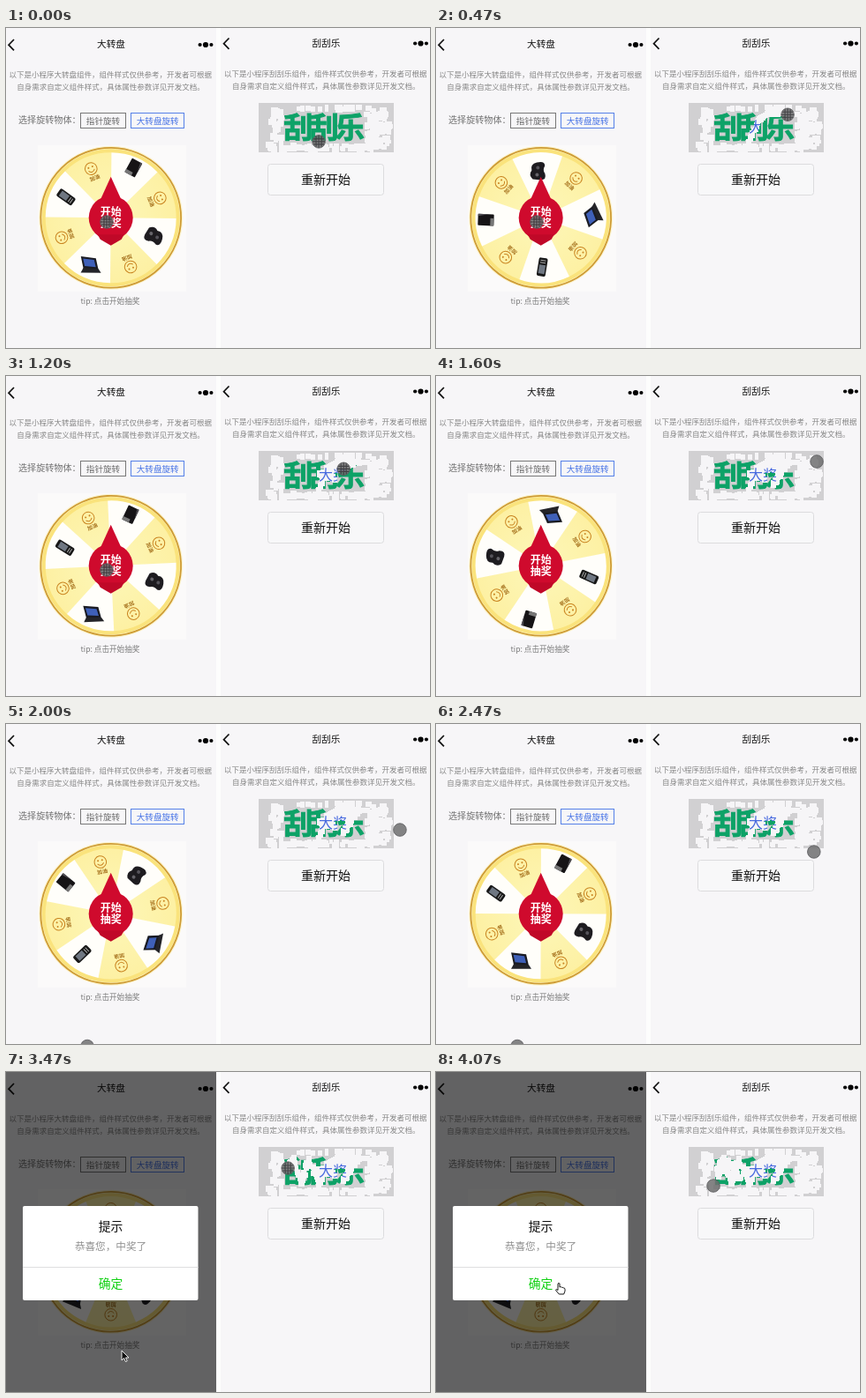
An HTML page with a canvas for the animation above (4.14 s loop, 480x363 px).

```html
<!DOCTYPE html>
<html lang="zh">
<head>
<meta charset="utf-8">
<title>大转盘与刮刮乐</title>
<style>
html, body { margin: 0; width: 100%; height: 100%; overflow: hidden; background: #fdfdfd; }
#stage { position: absolute; left: 0; top: 0; width: 480px; height: 363px; }
svg, canvas { position: absolute; left: 0; top: 0; }
#cover { left: 286px; top: 85px; }
text { font-family: "Noto Sans CJK SC", "Noto Sans CJK", "Noto Sans CJK JP", sans-serif; text-anchor: middle; }
.title { font-size: 10.6px; font-weight: 500; fill: #111; }
.note { font-size: 8.5px; font-weight: 500; fill: #868686; }
.left { text-anchor: start; }
.line { fill: none; stroke-width: 1; }
</style>
</head>
<body>
<div id="stage">
<svg width="480" height="363">
  <defs>
    <g id="nav">
      <path d="M9 13L3 19.2L9 25.4" fill="none" stroke="#111" stroke-width="1.7"/>
      <circle cx="219.6" cy="19" r="2.1"/><circle cx="226" cy="19" r="3.1"/><circle cx="232.4" cy="19" r="2.1"/>
    </g>
    <path id="slice" d="M0 0V-75A75 75 0 0 1 53.03 -53.03Z" fill="#fffefa"/>
    <g id="smile" transform="translate(0 -60)">
      <circle r="6.8" class="line" stroke="#c98420"/>
      <path d="M-3.6 1.6Q0 6 3.6 1.6" class="line" stroke="#c98420"/>
      <circle cx="-2.4" cy="-1.8" r="1" fill="#c98420"/><circle cx="2.4" cy="-1.8" r="1" fill="#c98420"/>
      <text y="13.3" font-size="6" font-weight="700" fill="#a5701c">加油</text>
    </g>
    <radialGradient id="gold">
      <stop offset=".3" stop-color="#fdf5b2"/><stop offset="1" stop-color="#fdf0a2"/>
    </radialGradient>
  </defs>

  <rect width="238" height="363" fill="#f7f6f8"/>
  <rect x="243" width="237" height="363" fill="#f7f6f8"/>

  <use href="#nav"/>
  <text class="title" x="119" y="22">大转盘</text>
  <text class="note" x="118.3" y="55.6">以下是小程序大转盘组件，组件样式仅供参考，开发者可根据</text>
  <text class="note" x="118.5" y="69.6">自身需求自定义组件样式，具体属性参数详见开发文档。</text>
  <text class="left" x="14" y="108" font-size="10.1" font-weight="500" fill="#707070">选择旋转物体：</text>
  <rect class="line" x="84.5" y="96.5" width="51" height="17" stroke="#777"/>
  <text x="110" y="108.6" font-size="9.6" font-weight="500" fill="#6a6a6a">指针旋转</text>
  <rect class="line" x="141.5" y="96.5" width="60" height="17" stroke="#5580e8"/>
  <text x="171.7" y="108.6" font-size="9.6" font-weight="500" fill="#4673e6">大转盘旋转</text>

  <rect x="36" y="133" width="168" height="166" fill="#fbfafa"/>
  <g transform="translate(118.7 215.3)">
    <circle r="81.5" fill="#fbf3cf"/>
    <g id="wheel">
      <circle r="78" fill="url(#gold)"/>
      <use href="#slice"/><use href="#slice" transform="rotate(90)"/>
      <use href="#slice" transform="rotate(180)"/><use href="#slice" transform="rotate(270)"/>
      <circle r="76" fill="none" stroke="#fae37c" stroke-width="4"/>
      <circle r="79.4" fill="none" stroke="#cf9c33" stroke-width="1.8"/>
      <use href="#smile" transform="rotate(-22.5)"/><use href="#smile" transform="rotate(67.5)"/>
      <use href="#smile" transform="rotate(157.5)"/><use href="#smile" transform="rotate(247.5)"/>
      <g transform="translate(25 -57) rotate(28)">
        <rect x="-6.5" y="-9" width="13" height="18" rx="1" fill="#161416"/>
        <path d="M-6.5 5H2V9H-6.5Z" fill="#777"/><path d="M4 -9H6.5V3Z" fill="#4d4b50"/>
      </g>
      <g transform="translate(49 20) rotate(25)">
        <path d="M-9 -6Q-4 -11 1 -7Q8 -9 10 -1Q12 8 6 8Q1 5 -3 8Q-10 10 -10 3Z" fill="#1e1c20"/>
        <circle cx="-4" cy="-1" r="2" fill="#66646a"/><circle cx="4" cy="0" r="2" fill="#55535a"/>
      </g>
      <g transform="translate(-22.5 53)">
        <path d="M-11 -9L6 -7L9 6L-8 5Z" fill="#1a1b22"/>
        <path d="M-8.5 -6.5L4 -5L6 3L-6.5 2Z" fill="#3f60b8"/>
        <path d="M-8 4L9 5L12 9.5L-11 9.5Z" fill="#242428"/>
      </g>
      <g transform="translate(-51 -23) rotate(-55)">
        <rect x="-5" y="-10.5" width="10" height="21" rx="2" fill="#181818"/>
        <rect x="-3.5" y="-7.5" width="7" height="10" fill="#6f7782"/>
        <path d="M-3 5H3M-3 7.5H3" stroke="#aaa"/>
      </g>
    </g>
    <path d="M0 -46.5L12.5 -19H-12.5Z" fill="#cf0a2d"/>
    <circle r="25" fill="#cf0a2d"/>
    <path d="M-15 19H15L12 24.5L0 31.5L-12 24.5Z" fill="#c00828"/>
    <g font-size="12" font-weight="700" fill="#fff"><text y="-2">开始</text><text y="10.3">抽奖</text></g>
  </g>
  <text x="118" y="313" font-size="8.6" font-weight="500" fill="#7a7a7a">tip: 点击开始抽奖</text>

  <use href="#nav" x="243.5" y="-1.5"/>
  <text class="title" x="362.5" y="21.2">刮刮乐</text>
  <text class="note" x="361.8" y="55.4">以下是小程序刮刮乐组件，组件样式仅供参考，开发者可根据</text>
  <text class="note" x="362.3" y="69.4">自身需求自定义组件样式，具体属性参数详见开发文档。</text>
  <rect x="286" y="85" width="153" height="56" fill="#f6f5f7"/>
  <text x="370" y="118.2" font-size="16" font-weight="500" fill="#4769df">大奖</text>
  <rect x="296.5" y="154.5" width="131" height="35" rx="3" fill="#f8f8f9" stroke="#dcdcde"/>
  <text x="362" y="177.3" font-size="14" font-weight="500" fill="#111">重新开始</text>
</svg>
<canvas id="cover" width="153" height="56"></canvas>
<svg width="480" height="363">
  <defs>
    <circle id="touch" r="7.3" fill="#6e6e70" fill-opacity=".85" stroke="#5a5a5c" stroke-width=".8"/>
    <path id="mesh" d="M-6 -3H6M-7 0H7M-6 3H6M-3 -6V6M0 -7V7M3 -6V6" stroke="#2c2c30" stroke-width="1.1" opacity=".75"/>
  </defs>
  <g id="dialog">
    <rect width="238" height="363" fill="#000" fill-opacity=".6"/>
    <rect x="19" y="152" width="198.5" height="107" rx="2" fill="#fff"/>
    <text x="118.5" y="180" font-size="13.8" fill="#111">提示</text>
    <text x="118.5" y="202.3" font-size="11.6" fill="#909090">恭喜您，中奖了</text>
    <path d="M19 221.5H217.5" stroke="#dedee0"/>
    <text x="118.5" y="245" font-size="13.8" font-weight="500" fill="#0fd011">确定</text>
  </g>
  <g id="tap"><use href="#touch"/><use id="tapMesh" href="#mesh"/></g>
  <g id="finger"><use href="#touch"/><use id="fingerMesh" href="#mesh"/></g>
  <g id="mouse" stroke-linejoin="round">
    <path id="arrow" d="M0 0V11L2.6 8.6L4.4 12.6L6.2 11.8L4.5 8H8Z" fill="#111" stroke="#fff" stroke-width=".9"/>
    <path id="hand" d="M3 6.5V1.2Q4 -.4 5 1.2V5Q7 4.2 7.4 5.4Q9 4.9 9.3 6Q11 5.7 11 7.5V9.5L9.7 13H4.3L.4 8.4Q.6 6.6 3 8.5Z" fill="#fff" stroke="#111"/>
  </g>
</svg>
</div>
<script>
const LOOP = 4140, FINAL = 1102.5;
const $ = id => document.getElementById(id);
const ctx = $("cover").getContext("2d");

// [time, square root of the angle still to turn]
const spin = [[0, 33.2], [200, 32.3], [400, 30.3], [800, 24.65], [1600, 14.63], [2470, 4.74], [2830, 0]];
// [time, x, y]
const scratch = [
  [0, 354, 129], [150, 364, 106], [300, 374, 98], [450, 402, 97], [600, 374, 106], [800, 355, 111],
  [950, 372, 117], [1100, 362, 104], [1250, 392, 106], [1400, 382, 123], [1500, 400, 98], [1600, 431, 97],
  [2000, 446, 120], [2470, 428, 145], [2870, 359, 134], [3050, 342, 98], [3200, 334, 128],
  [3330, 326, 96], [3470, 319, 109], [3650, 345, 122], [3800, 330, 100], [4070, 314, 129]
];
const mousePath = [[3200, 131, 316], [3740, 131, 316], [4000, 135, 239]];

function at(keys, t) {
  if (t <= keys[0][0]) return keys[0].slice(1);
  for (let i = 1; i < keys.length; i++) {
    const a = keys[i - 1], b = keys[i];
    if (t <= b[0]) {
      const k = (t - a[0]) / (b[0] - a[0]);
      return a.slice(1).map((v, j) => v + (b[j + 1] - v) * k);
    }
  }
  return keys[keys.length - 1].slice(1);
}

function random(seed) {
  return () => (seed = seed * 16807 % 2147483647) / 2147483647;
}

const pressed = t => t < 1500 || t > 2900 && t < 4000;
const show = (id, on) => $(id).setAttribute("visibility", on ? "visible" : "hidden");
const move = (id, [x, y]) => $(id).setAttribute("transform", `translate(${x} ${y})`);

const rnd = random(4711), dabs = [];
while (dabs.length < 170) {
  const x = 12 + rnd() * 136, y = 5 + rnd() * 48;
  if (x > 26 && x < 122 && y > 7 && y < 48) continue;
  dabs.push({ t: -1, x, y, w: 4 + rnd() * 5, h: 4 + rnd() * 5 });
}
for (let t = 0; t < 4070; t += 14) {
  const jx = rnd() * 3 - 1.5, jy = rnd() * 3 - 1.5;
  if (!pressed(t)) continue;
  const [x, y] = at(scratch, t);
  dabs.push({ t, x: x - 286 + jx, y: y - 85 + jy, w: 6, h: 6 });
}

function drawCover(t) {
  ctx.fillStyle = "#d1d0d2";
  ctx.fillRect(0, 0, 153, 56);
  ctx.font = '900 33px "Noto Sans CJK SC", "Noto Sans CJK", "Noto Sans CJK JP", sans-serif';
  ctx.textAlign = "center";
  ctx.lineWidth = 1;
  ctx.fillStyle = ctx.strokeStyle = "#0da267";
  [..."刮刮乐"].forEach((c, i) => {
    ctx.fillText(c, 45 + i * 29.3, 39.5);
    ctx.strokeText(c, 45 + i * 29.3, 39.5);
  });
  for (const d of dabs) {
    if (d.t > t) break;
    ctx.clearRect(Math.round(d.x - d.w / 2), Math.round(d.y - d.h / 2), Math.round(d.w), Math.round(d.h));
  }
}

function frame() {
  const t = performance.now() % LOOP;
  const rest = at(spin, t)[0];
  $("wheel").setAttribute("transform", `rotate(${FINAL - rest * rest})`);
  drawCover(t);

  $("dialog").setAttribute("opacity", Math.min(1, Math.max(0, (t - 2730) / 215)));

  move("finger", at(scratch, t));
  show("fingerMesh", pressed(t));

  show("tap", t < 1500 || t > 1900 && t < 3100);
  show("tapMesh", t < 1500);
  move("tap", t < 1500 ? [114, 220] : [92, 365.5]);

  const spot = at(mousePath, t), over = spot[1] < 258;
  move("mouse", spot);
  show("arrow", t > 3200 && !over);
  show("hand", t > 3200 && over);
  requestAnimationFrame(frame);
}
frame();
</script>
</body>
</html>
```
